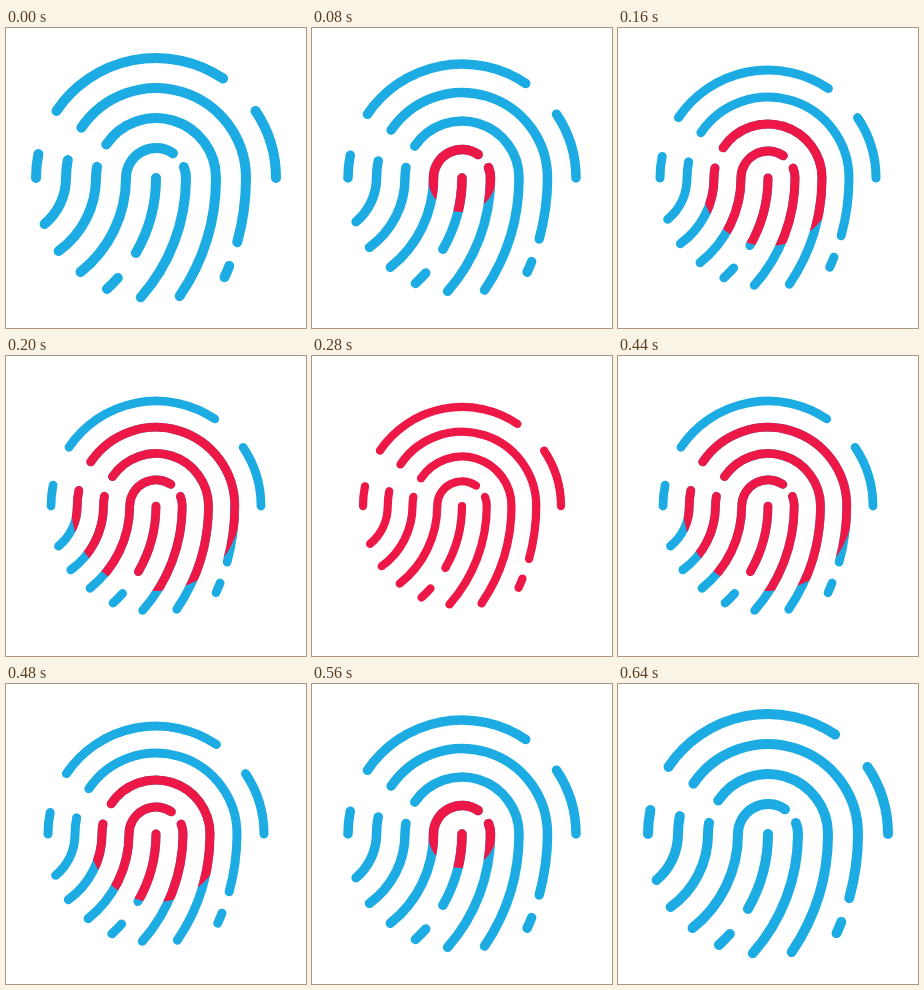
Animation of 300x300 px, one loop 1 s. Source, as an HTML page:

```html
<!DOCTYPE html>
<html lang="en">
<head>
<meta charset="utf-8">
<title>Fingerprint scan</title>
<style>
  html, body { margin: 0; width: 100%; height: 100%; overflow: hidden; background: #fff; }
  svg { display: block; width: 100%; height: 100%; }
</style>
</head>
<body>
<svg viewBox="0 0 300 300">
  <defs>
    <path id="ridges" fill="none" stroke-width="10" stroke-linecap="round"/>
    <clipPath id="scan"><circle id="spot" cx="150" cy="150" r="0"/></clipPath>
  </defs>
  <g id="base" stroke="#1cabe2"><use href="#ridges"/></g>
  <g clip-path="url(#scan)">
    <g id="lit" stroke="#ed1846"><use href="#ridges"/></g>
  </g>
</svg>
<script>
const LOOP = 1000, STEP = 40, HALF = 320;
const MID = 150;
const byId = id => document.getElementById(id);

// Point on a circle centred at (cx, MID); angles in degrees, clockwise from the right.
function polar(cx, r, deg) {
  const a = deg * Math.PI / 180;
  return (cx + r * Math.cos(a)).toFixed(2) + ' ' + (MID + r * Math.sin(a)).toFixed(2);
}

function arc(cx, r, from, to) {
  const large = Math.abs(to - from) > 180 ? 1 : 0;
  const sweep = to > from ? 1 : 0;
  return `M${polar(cx, r, from)}A${r} ${r} 0 ${large} ${sweep} ${polar(cx, r, to)}`;
}

// Upper arcs circle the middle; the tails circle a point on the left edge.
const upper = (r, from, to) => arc(MID, r, from, to);
const tail = (r, from, to) => arc(0, r, from, to);
const joined = (r, from, to, tailR, end) =>
  upper(r, from, to) + tail(tailR, 0, end).replace(/^M[^A]*/, '');

byId('ridges').setAttribute('d', [
  upper(120, 214, 304),
  upper(120, 326, 360),
  upper(120, 180, 191.5),
  joined(90, 214, 360, 240, 15.5),
  tail(240, 21.5, 24.4),
  joined(60, 214, 360, 210, 34.2),
  joined(30, 304.5, 180, 120, 51.6),
  tail(150, 0, 30),
  tail(150, 41.8, 47.7),
  joined(30, 338.5, 360, 180, 41.5),
  joined(60, 190.7, 180, 90, 54.2),
  joined(90, 191.5, 180, 60, 50)
].join(''));

function draw(ms) {
  const t = Math.floor((ms % LOOP) / STEP) * STEP;
  const p = Math.max(0, 1 - Math.abs(t - HALF) / HALF);
  const pose = `translate(${MID} ${MID}) scale(${1 - 0.2 * p}) translate(${-MID} ${-MID})`;
  byId('base').setAttribute('transform', pose);
  byId('lit').setAttribute('transform', pose);
  byId('spot').setAttribute('r', 136 * p);
  // Hide the blue once fully covered, so no fringe shows around the red.
  byId('base').setAttribute('visibility', p > 0.85 ? 'hidden' : 'visible');
}

const start = performance.now();
function tick() {
  draw(performance.now() - start);
  requestAnimationFrame(tick);
}
tick();
</script>
</body>
</html>
```
